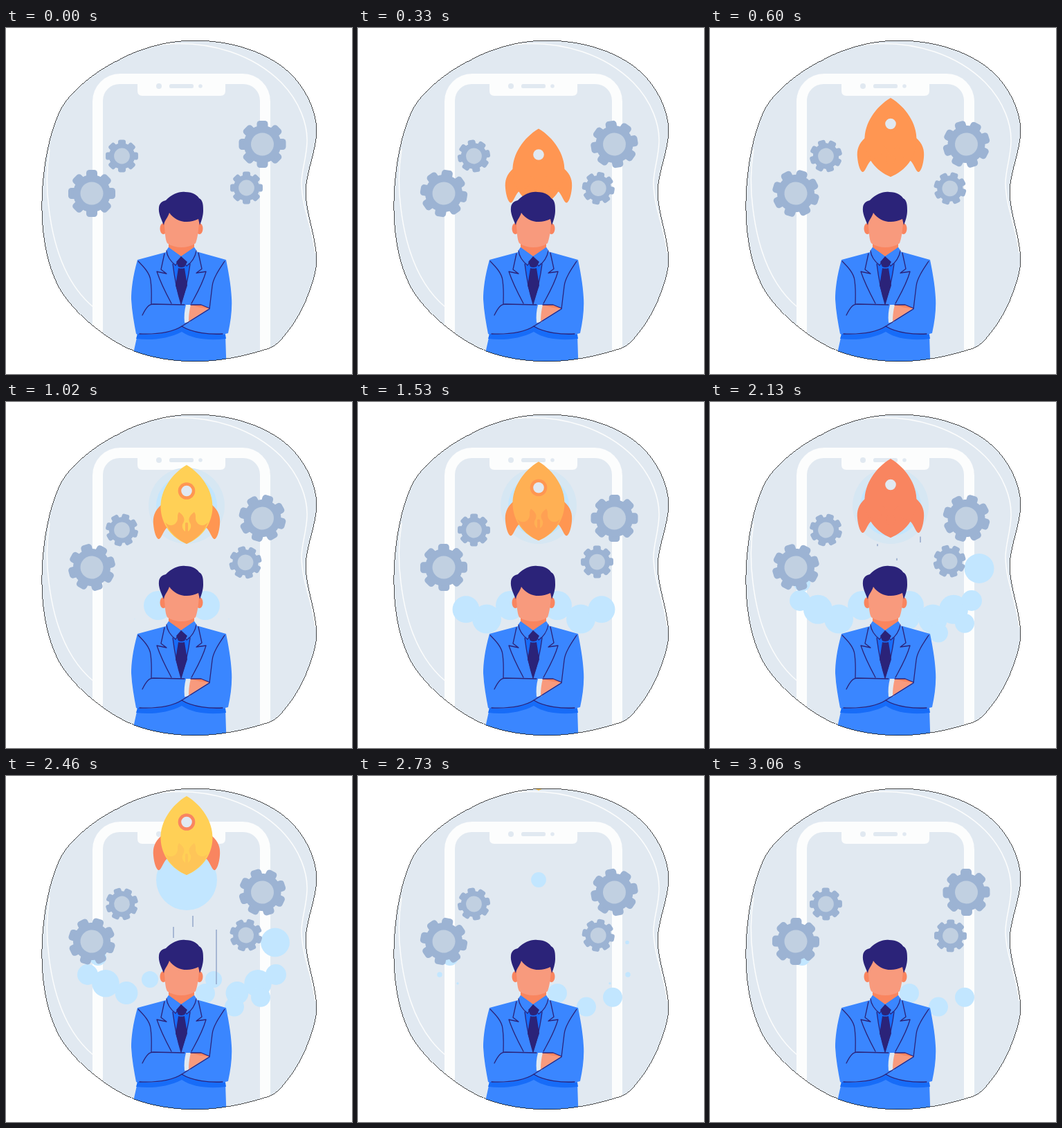
Write an HTML page that moves like this. It is 500 px wide and 500 px high and loops after 3090 ms.

```html
<!DOCTYPE html>
<html lang="en">
<head>
<meta charset="utf-8">
<title>Rocket launch</title>
<style>
  html, body { margin: 0; width: 100%; height: 100%; overflow: hidden; background: #fff; }
  svg { display: block; width: 100vw; height: 100vh; }
  .ink { fill: none; stroke: #2b2379; stroke-width: 1.3; stroke-linecap: round; stroke-linejoin: round; }
</style>
</head>
<body>
<svg viewBox="0 0 500 500">
  <defs>
    <path id="blob" d="M275 18 C332 19 380 37 410 65 C434 88 448 120 449 148 C448 180 434 205 433 238 C434 270 449 305 449 338 C446 370 426 417 405 441 C397 452 390 459 380 463 C345 474 310 482 270 482 C240 481 212 477 185 467 C145 450 105 417 82 384 C60 350 51 300 52 250 C53 200 63 150 79 118 C90 96 120 70 150 53 C190 30 230 18 275 18Z"/>
    <clipPath id="inside"><use href="#blob"/></clipPath>
    <g id="gear">
      <g id="cross" fill="#9cb3d3">
        <rect x="-8" y="-34" width="16" height="68" rx="4.5"/>
        <rect x="-34" y="-8" width="68" height="16" rx="4.5"/>
      </g>
      <use href="#cross" transform="rotate(45)"/>
      <circle r="27" fill="#9cb3d3"/>
      <circle r="16.5" fill="#c1d0e1"/>
    </g>
    <path id="fin" d="M225 57 C214 66 212 76 213 86 C214 97 217 105 220 107 C224 108 226 98 232 91 L245 95 L240 57Z"/>
    <path id="flame" d="M230 83 C236 89 243 88 246 83 C250 78 246 73 250 68 C258 74 259 79 256 84 C253 88 256 95 259 96 V84 L261 83 V114 C248 108 236 97 230 83Z"/>
  </defs>

  <use href="#blob" fill="#e1e9f1"/>
  <g clip-path="url(#inside)">
    <g fill="none" stroke="#fcfdfd" stroke-width="1.5">
      <path d="M222 24 C298 16 360 41 398 79 C425 107 436 140 435 165 C434 190 427 205 427 225 C428 260 443 290 447 325"/>
      <path d="M63 175 C59 200 58 232 62 261 C69 318 87 371 127 404"/>
    </g>
    <path d="M125 500 V106 A40 40 0 0 1 165 66 H342 A40 40 0 0 1 382 106 V500 H367 V105 A24 24 0 0 0 343 81 H317 V91 Q317 98 310 98 H197 Q190 98 190 91 V81 H164 A24 24 0 0 0 140 105 V500Z" fill="#fcfdfd"/>
    <g fill="#e1e9f1">
      <circle cx="221" cy="84" r="4"/>
      <rect x="236" y="81" width="35" height="6" rx="2.5"/>
      <circle cx="281" cy="84" r="2.8"/>
    </g>

    <circle id="halo" cx="261" cy="150" fill="#d6e7f3"/>
    <circle id="glow" cx="261" cy="150" fill="#c2e6ff"/>
    <g id="puffs" fill="#c2e6ff"></g>
    <g id="streaks" stroke="#8fa3c6" stroke-width="1.4"></g>

    <g id="rocket">
      <g id="fins">
        <use href="#fin"/>
        <use href="#fin" transform="matrix(-1 0 0 1 522 0)"/>
      </g>
      <path id="hull" d="M261 0 C283 13 299 37 298.5 61 C298 86 282 106 261 114 C240 106 224 86 223.5 61 C223 37 239 13 261 0Z"/>
      <g id="flames">
        <use href="#flame"/>
        <use href="#flame" transform="matrix(-1 0 0 1 522 0)"/>
      </g>
      <circle id="rim" cx="261" cy="37.5" r="12.3"/>
      <circle cx="261" cy="37.5" r="7.8" fill="#e1e9f1"/>
    </g>

    <g id="gears"></g>

    <g id="man">
      <path d="M235 303 V320 L253 331 L272 320 V303Z" fill="#f9855f"/>
      <path d="M235 317 L231 324 L190 335 C183 360 181 378 181 392 C182 410 185 426 188 442 L190 443 L184 470 V490 H318.5 L317 442 L321 441 C325 423 327 405 326 390 C325 370 321 350 318 335 L275 323 L272 317 L253 330Z" fill="#3a86ff"/>
      <path d="M190 442 C215 445 237 441 254 431 C270 440 292 443 317 443 L318 449 C295 452 270 450 254 439 C235 449 210 452 188 449Z" fill="#176cf8"/>
      <path d="M241 341 C244 365 247 380 253 399 C259 380 263 365 266 341 L253 332Z" fill="#176cf8"/>
      <path d="M232 321 L245 343 L253 331 L261 344 L275 321 L272 317 L253 330 L235 317Z" fill="#3a86ff"/>
      <g fill="#f9855f">
        <ellipse cx="227.5" cy="290" rx="5" ry="8"/>
        <ellipse cx="279.5" cy="290" rx="5" ry="8"/>
      </g>
      <path d="M236 262 C233 272 228 277 229 287 C230 297 230 305 233 311 C245 319 262 319 274 311 C278 300 278 290 280 272Z" fill="#f89a7d"/>
      <path d="M228 285 C224 275 220 268 221 259 C222 252 227 250 231 249 C240 240 250 236 259 237 C270 237 277 242 279 246 C285 249 285 257 285 264 C285 272 282 280 280 285 L278 276 C262 284 245 280 236 267 C234 274 229 278 228 285Z" fill="#2b2379"/>
      <g fill="#2b2379">
        <path d="M253 330 L262 338 L258 345 Q253 347 249 345 L246 338Z"/>
        <path d="M249 347 Q253 348 258 347 L262 372 L253 399 L245 372Z"/>
      </g>
      <path d="M260 400 H269 L266 425 L258 426 C257 416 258 408 260 400Z" fill="#e1e9f1"/>
      <path d="M267 400 H282 L294 405 L264 424 C264 415 265 408 267 400Z" fill="#f89a7d"/>
      <path d="M267 400 H282 L294 405 C285 405 276 403 267 400Z" fill="#f9855f"/>
      <g class="ink">
        <path d="M232 322 C233 332 239 338 245 343 L253 331 L261 344 C268 339 273 333 275 322"/>
        <path d="M241 341 C244 365 247 380 253 399 C259 380 263 365 266 341"/>
        <path d="M229 326 L224 349 L232 355 L218 352 C224 370 232 385 239 398"/>
        <path d="M278 325 L283 348 L275 354 L289 352 C284 370 275 385 268 398"/>
        <path d="M191 337 C198 344 208 354 209 365 C211 380 210 390 210 399"/>
        <path d="M197 415 C203 403 207 399 213 399 L258 400"/>
        <path d="M316 337 C308 349 299 362 298 373 L294 406 L254 431"/>
        <path d="M193 442 C220 443 240 440 254 431 C270 441 295 443 313 442"/>
        <path d="M267 400 H282 L294 405"/>
      </g>
    </g>
  </g>
  <use href="#blob" fill="none" stroke="#000" stroke-width=".7" shape-rendering="crispEdges"/>
</svg>

<script>
const LOOP = 3090, STEP = 30;
const $ = id => document.getElementById(id);

function set(node, attrs) {
  for (const key in attrs) node.setAttribute(key, attrs[key]);
}
function add(parent, name, attrs = {}) {
  const node = document.createElementNS('http://www.w3.org/2000/svg', name);
  set(node, attrs);
  return parent.appendChild(node);
}

// Progress from 0 to 1 between two times.
const ramp = (t, from, to) => Math.min(1, Math.max(0, (t - from) / (to - from)));
const smooth = u => u * u * (3 - 2 * u);
const mix = (a, b, u) => a.map((v, i) => Math.round(v + (b[i] - v) * u));
const rgb = color => `rgb(${color})`;

// Grows in over 300 ms from born, shrinks away over 400 ms from dies.
const life = (t, born, dies) =>
  smooth(ramp(t, born, born + 300)) * (1 - smooth(ramp(t, dies, dies + 400)));

const puffs = [];
function puff(x, y, r, born, dies = LOOP, drift = 0) {
  puffs.push({ x, y, r, born, dies, drift, node: add($('puffs'), 'circle') });
}

// Smoke rolls outwards on both sides, with a lower row on the right.
for (let i = 0; i < 4; i++) {
  const reach = 34 + 36 * i - 2 * i * i;
  const y = 306 - 12 * Math.cos(2.4 * i) - 1.3 * i * i;
  const r = i < 3 ? 21 : 15;
  for (const side of [-1, 1]) {
    puff(254 + side * reach, y, r, 700 + 290 * i, 2280 + 60 * i, 12 * side);
  }
  if (i < 3) puff(254 + reach + 8 * i, y + 20, 14, 1600);
}
puff(389, 240.5, 21.5, 1700, 2420);
puff(133, 262, 12, 1800);

const streaks = [];
function streak(x, y, shift, length) {
  streaks.push({ y, shift, length, node: add($('streaks'), 'line', { x1: x, x2: x }) });
}
streak(242, 204, 14, 14);
streak(270, 228, -26, 14);
streak(304, 192, 30, 77);

const gears = [];
function gear(x, y, scale, spin, orbit = 0) {
  gears.push({ x, y, scale, spin, orbit, node: add($('gears'), 'use', { href: '#gear' }) });
}
gear(124, 239, 1, 1);
gear(370.5, 168, 1, -1);
gear(167.5, 185, .69, -1);
gear(346.5, 231, .69, 1, 1);

function rocketTop(t) {
  const rise = (1 - ramp(t, 120, 600)) ** 3;
  const hover = Math.sqrt(ramp(t, 600, 2130));
  const launch = Math.max(0, (t - 2130) / 330) ** 2;
  return 101 + 250 * rise - 19 * hover - 53 * launch;
}

function paintRocket(t) {
  const rust = mix([255, 150, 82], [249, 133, 96], ramp(t, 1530, 2130));
  const yellow = [255, 208, 86];
  const warmth = ramp(t, 600, 1020) - .55 * ramp(t, 1020, 1530)
    - .45 * ramp(t, 1530, 2130) + ramp(t, 2130, 2460);
  set($('fins'), { fill: rgb(rust) });
  set($('rim'), { fill: rgb(rust) });
  set($('hull'), { fill: rgb(mix(rust, yellow, warmth)) });
  set($('flames'), { fill: rgb(mix(rust, yellow, warmth * (t < 2130 ? .4 : .85))) });
}

function render(t) {
  for (const { x, y, r, born, dies, drift, node } of puffs) {
    const size = life(t, born, dies);
    set(node, { cx: x + drift * ramp(t, 2130, 2460), cy: y, r: r * size });
  }

  const pull = Math.max(0, (t - 2100) / 360);
  for (const { y, shift, length, node } of streaks) {
    const y1 = y + shift * pull;
    set(node, { y1, y2: y1 + 2 + length * pull, opacity: t > 2100 && t < 2700 ? 1 : 0 });
  }

  // Gears turn one tooth forward, then back.
  const turn = 45 * (1 - Math.abs(1 - 2 * t / LOOP));
  const phase = 2 * Math.PI * t / LOOP;
  for (const { x, y, scale, spin, orbit, node } of gears) {
    const dx = orbit * Math.cos(phase), dy = orbit * Math.sin(phase);
    set(node, { transform: `translate(${x + dx} ${y + dy}) rotate(${spin * turn}) scale(${scale})` });
  }

  set($('glow'), { r: 44 * life(t, 700, 2460) });
  set($('halo'), { r: 55 * life(t, 700, 2140) });
  set($('rocket'), { transform: `translate(0 ${rocketTop(t)})` });
  paintRocket(t);
}

const began = performance.now();
function tick() {
  const t = (performance.now() - began) % LOOP;
  render(Math.floor(t / STEP) * STEP);
  requestAnimationFrame(tick);
}
render(0);
requestAnimationFrame(tick);
</script>
</body>
</html>
```
